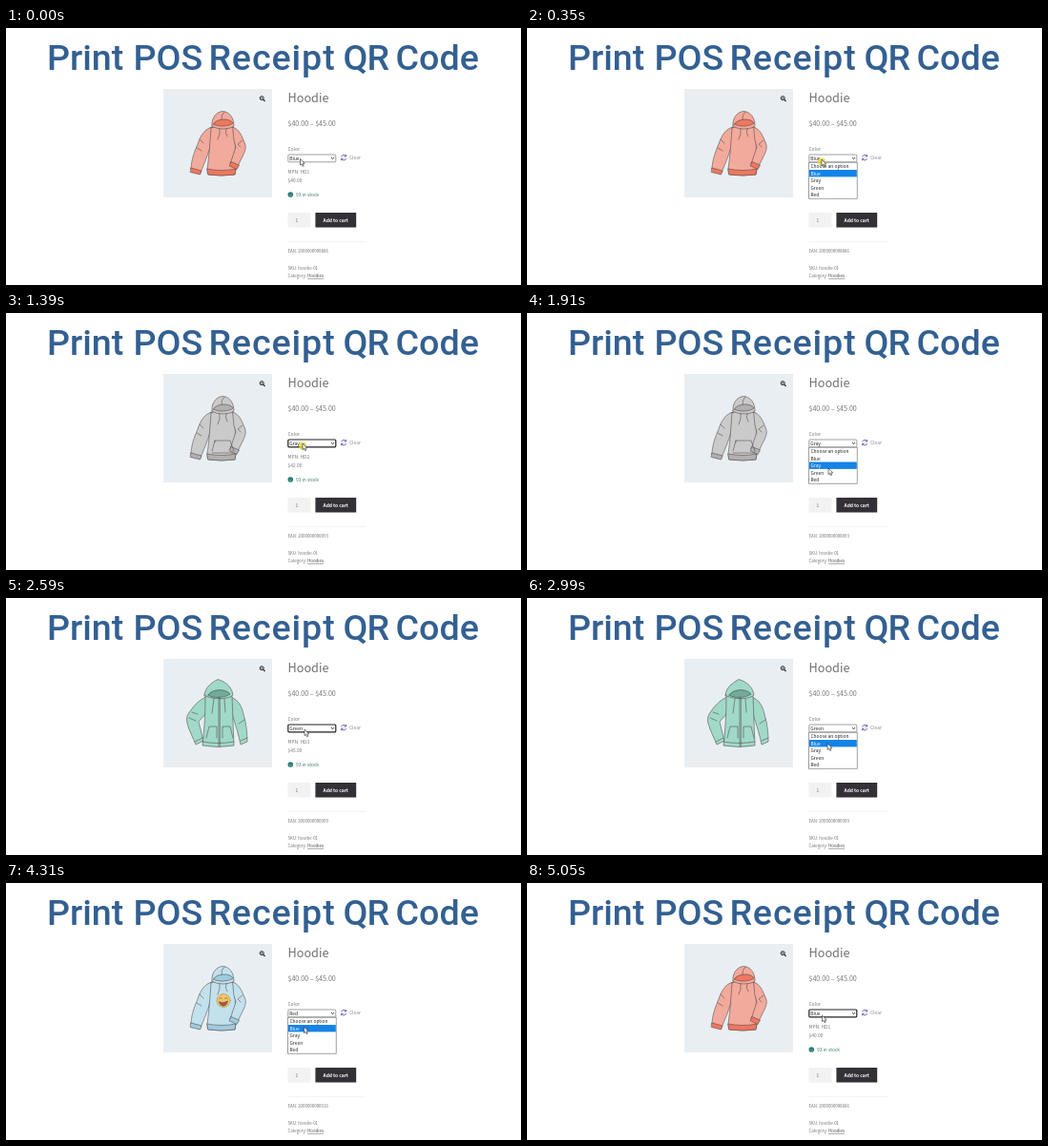
An HTML page that plays this animation: 540x270 px, repeating every 5120 ms.

```html
<!DOCTYPE html>
<html lang="en">
<head>
<meta charset="utf-8">
<title>Print POS Receipt QR Code</title>
<style>
  html, body { margin: 0; width: 100%; height: 100%; overflow: hidden; background: #fff; }
  svg { display: block; width: 100%; height: 100%; }
  text { font: 4.9px "Noto Sans CJK JP", "Noto Sans CJK SC", "Noto Sans CJK", "Open Sans", sans-serif; fill: #747474; white-space: pre; }
  #title { font: 500 37.6px Roboto, sans-serif; fill: #336092; }
  #name { font-size: 12.7px; font-weight: 300; fill: #707070; }
  #range { font-size: 7.1px; }
  .meta text { font-size: 4.4px; }
  .dark text, text.dark { fill: #222; }
  .garment { stroke: #4d4444; stroke-width: .55; stroke-linejoin: round; stroke-linecap: round; }
  .line { fill: none; }
</style>
</head>
<body>
<svg viewBox="0 0 540 270">
  <text id="title" y="44"><tspan x="43">Print</tspan><tspan x="133.5">POS</tspan><tspan x="212.5" letter-spacing=".9">Receipt</tspan><tspan x="353.5" letter-spacing="-1">QR</tspan><tspan x="408.5">Code</tspan></text>

  <rect x="165" y="64" width="114" height="114" fill="#e9eef2"/>
  <g id="products"></g>
  <g fill="none" stroke="#222">
    <circle cx="268.2" cy="73.7" r="2" stroke-width="1"/>
    <path d="M269.7 75.2l1.8 1.8" stroke-width="1.2"/>
    <path d="M267.2 73.7h2M268.2 72.7v2" stroke-width=".5"/>
  </g>

  <text id="name" x="295.5" y="78.2">Hoodie</text>
  <text id="range" x="295.5" y="102.7">$40.00 – $45.00</text>
  <text x="295.5" y="129">Color</text>
  <text id="mpn" x="295.5" y="153.2"></text>
  <text id="price" x="295.5" y="162"></text>
  <circle cx="298.3" cy="175" r="2.8" fill="#217a70"/>
  <path d="M296.9 175.4q1.4 1.6 2.8 0M297.3 174h.3M299 174h.3" fill="none" stroke="#bfe0d8" stroke-width=".5"/>
  <text x="304" y="177" style="fill:#3c7b60">93 in stock</text>

  <g fill="none" stroke="#5d55a5" stroke-width=".9">
    <path d="M351.7 135.3a2.5 2.5 0 0 1 4.5-.8M356.5 137a2.5 2.5 0 0 1-4.5.8"/>
    <path d="M356.6 133v2h-2M351.6 139.2v-2h2"/>
  </g>
  <text x="360" y="138.3" style="fill:#8a8798">Clear</text>

  <rect x="295.5" y="194" width="24" height="15.5" fill="#f2f2f2"/>
  <text x="303.5" y="203.6">1</text>
  <rect x="324.4" y="194" width="42.8" height="15.5" fill="#333036"/>
  <text x="345.7" y="203.6" text-anchor="middle" style="fill:#fff;font-weight:700">Add to cart</text>
  <path d="M295.5 224.5H378" stroke="#f1f1f1" stroke-width=".8"/>

  <g class="meta">
    <text id="ean" x="295.5" y="235.6"></text>
    <text x="295.5" y="254">SKU: hoodie-01</text>
    <text x="295.5" y="262.3">Category: <tspan text-decoration="underline" fill="#444">Hoodies</tspan></text>
  </g>

  <rect id="select" x="295.8" y="133" width="50" height="7.8" rx="1" fill="#fff"/>
  <text id="chosen" class="dark" x="297.3" y="138.8"></text>
  <path d="M341 136.1l1.5 1.6 1.5-1.6" fill="none" stroke="#222" stroke-width=".9"/>

  <g id="menu" class="dark">
    <rect x="295.6" y="141.2" width="50.6" height="38" fill="#fff" stroke="#777" stroke-width=".7"/>
    <rect id="hover" x="296" width="49.8" height="7.4" fill="#1583e6"/>
  </g>

  <g id="cursor">
    <circle id="halo" cx="0" cy="2.5" r="4" fill="#e5d536" opacity=".8"/>
    <path id="arrow" d="M0 0V6.6L1.5 5.3L2.6 7.7L3.7 7.2L2.7 4.9H4.7Z" fill="#fff" stroke="#222" stroke-width=".6"/>
    <path id="beam" d="M-1.3 -3.5H1.3M0 -3.5V3.5M-1.3 3.5H1.3" stroke="#333" stroke-width=".7"/>
  </g>
</svg>
<script>
const LOOP = 5120, ROW = 7.5, MENU_TOP = 141.5;
const $ = id => document.getElementById(id);
const show = (id, on) => $(id).setAttribute('display', on ? 'inline' : 'none');

function pullover(fill, trim, detail) {
  return `<g class="garment" fill="${fill}">
    <path d="M216 104C208 106 204 113 201 122C197 131 194 140 194 149L204 152C207 144 211 136 214 125Z"/>
    <path d="M215 105C222 102 233 102 239 105C241 118 240 135 241 148L240 154Q226 156 212 154L211 148C213 134 214 119 215 105Z"/>
    <path d="M238 104C245 107 247 113 250 120C253 126 250 131 247 137L242 147L235 143L241 125L239 118Z"/>
    <path fill="${trim}" d="M211 148Q226 151 241 148L240 154Q226 156 212 154Z"/>
    <path fill="${trim}" d="M194 147L205 150L203.5 154L193.5 151.5Z"/>
    <path fill="${trim}" d="M236 140.5L244.5 144L242 148.5L234.5 145Z"/>
    <path d="M216 103C215 94 221 88 227 87.5C235 88 239 95 239 103C234 107 221 107 216 103Z"/>
    <path fill="${trim}" d="M217.5 101C220 95 235 94 238 100C233 104 222 104 217.5 101Z"/>
    <path class="line" d="M224 105.5Q225 112 222 117M231 105.5Q229 110 232 114M203 117L207 121M200 126L205 129M248 118L243 122L246 125M229 88Q225 92 226 96"/>
    ${detail}</g>`;
}

function zipped(fill) {
  return `<g class="garment" fill="${fill}">
    <path d="M210 104C202 107 196 114 191 122C188 127 190 132 192 138L199 154L207 150L202 130L209 122Z"/>
    <path d="M235 104C243 106 247 113 249 122C252 132 253 142 253 151L246 154C244 144 241 134 237 122Z"/>
    <path d="M209 103C217 100 229 100 237 103C238 120 238 138 239 155Q222 158 206 155C208 138 209 120 209 103Z"/>
    <path d="M208 102C209 93 216 89 222 85.5C231 88 237 94 238 102C233 107 215 107 208 102Z"/>
    <path fill="#72aa9b" d="M212 102C216 95 231 95 235 101C229 105 218 106 212 102Z"/>
    <path class="line" d="M223 104V156M224.3 105V156M206 151Q222 154 239 151M198 151L206 147M246 150L253 147M218 106L216 121M229 106L230 120M210 147L213 135H221V147M227 147V135H235L238 147M192 126L199 129M195 120L201 122M250 128L244 132"/>
  </g>`;
}

const pocket = '<path class="line" d="M216 145L219 134H235L239 145M219 134V136M216 147H239"/>';
const smiley = `<circle cx="228" cy="123.5" r="7" fill="#f4c568" stroke="#b98536"/>
  <path d="M223.5 125Q228 127 232.5 124Q231 130 227 129Q224 128 223.5 125Z" fill="#a95845"/>
  <path class="line" d="M223.5 121.5q1.5-2 3 0M229.5 121q1.8-1 3 .5"/>`;

const products = [
  { color: 'Blue', price: '$40.00', ean: '2000000000886', art: pullover('#f1aa9c', '#ee775f', '') },
  { color: 'Gray', price: '$42.00', ean: '2000000000893', art: pullover('#cbcaca', '#b1b0b0', pocket) },
  { color: 'Green', price: '$45.00', ean: '2000000000909', art: zipped('#a0d9c8') },
  { color: 'Red', price: '$43.00', ean: '2000000000916', art: pullover('#c2e1ed', '#9fcbdd', smiley) }
];
$('products').innerHTML = products.map((p, i) => `<g id="art${i}">${p.art}</g>`).join('');

const options = ['Choose an option', ...products.map(p => p.color)];
$('menu').insertAdjacentHTML('beforeend', options.map((label, i) =>
  `<text id="option${i}" x="297.5" y="${MENU_TOP + i * ROW + 5.6}">${label}</text>`).join(''));

// Each visit to the menu: time it opens, time an option is picked.
const visits = [[350, 870], [1450, 2140], [2720, 3410], [4120, 4640]];

// Pointer stops: time, x, y.
const stops = [
  [0, 308.5, 137.5], [350, 309, 138], [690, 314, 157], [870, 314, 158],
  [1380, 311, 137], [1480, 311, 137], [1910, 316, 163], [2140, 316, 166],
  [2500, 313, 138], [2740, 313, 138], [3300, 318, 173], [3580, 318, 173],
  [4040, 312, 138], [4130, 312, 138], [4310, 312.5, 151], [4640, 312, 152],
  [4980, 310, 139], [5050, 309.5, 139], [LOOP, 308.5, 137.5]
];

function pointerAt(t) {
  const i = stops.findIndex(s => s[0] > t);
  const [t0, x0, y0] = stops[i - 1], [t1, x1, y1] = stops[i];
  const u = (t - t0) / (t1 - t0), k = u * u * (3 - 2 * u);
  return [x0 + (x1 - x0) * k, y0 + (y1 - y0) * k];
}

function draw(t) {
  const picks = visits.filter(v => v[1] <= t).length;
  const current = picks % products.length;
  const open = visits.some(([from, to]) => from <= t && t < to);
  const focused = picks > 0 && !open;
  const clicking = visits.flat().some(c => t > c - 110 && t < c + 60);
  const [x, y] = pointerAt(t);
  const product = products[current];

  products.forEach((p, i) => show('art' + i, i === current));
  $('mpn').textContent = 'MPN: HD' + (current + 1);
  $('price').textContent = product.price;
  $('ean').textContent = 'EAN: ' + product.ean;
  $('chosen').textContent = product.color;
  $('select').setAttribute('stroke', focused ? '#222' : '#777');
  $('select').setAttribute('stroke-width', focused ? 1.2 : .7);

  const row = y < MENU_TOP ? current + 1 : Math.min(4, Math.floor((y - MENU_TOP) / ROW));
  show('menu', open);
  $('hover').setAttribute('y', MENU_TOP + row * ROW);
  options.forEach((label, i) => $('option' + i).style.fill = i === row ? '#fff' : '');

  const overText = !open && y > 165;
  $('cursor').setAttribute('transform', `translate(${x} ${y})`);
  show('halo', clicking && !overText);
  show('arrow', !overText);
  show('beam', overText);
}

const start = performance.now();
function tick() {
  draw((performance.now() - start) % LOOP);
  requestAnimationFrame(tick);
}
tick();
</script>
</body>
</html>
```
